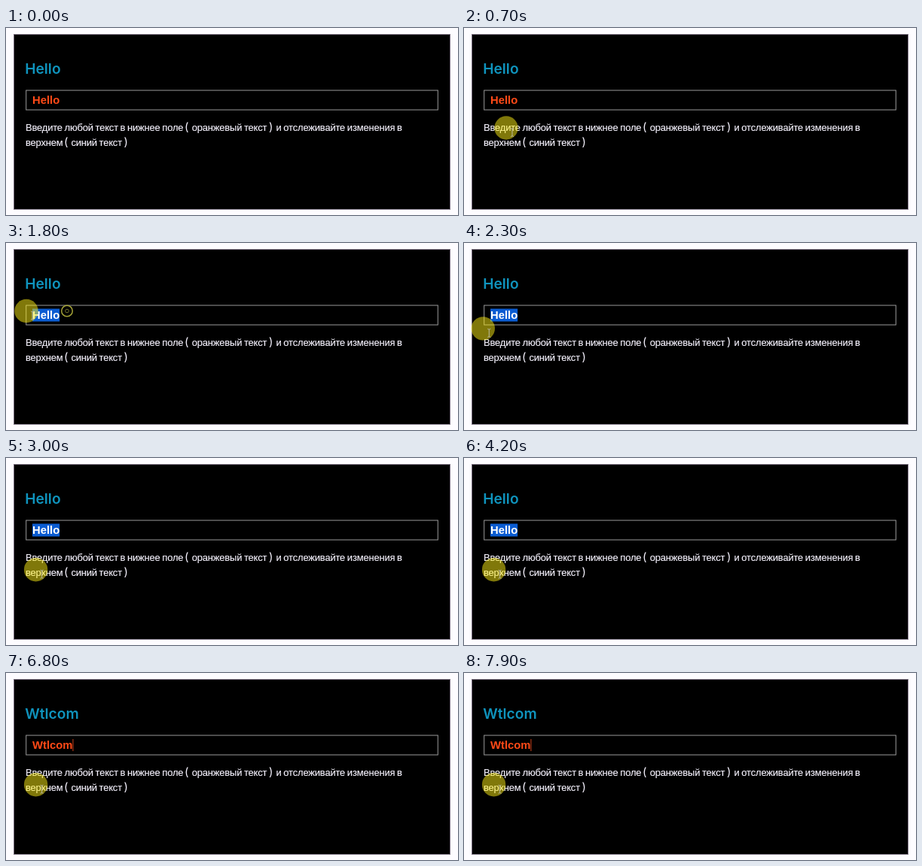
These frames come from a looping animation (600x249 px, 8 s). An HTML page:

```html
<!DOCTYPE html>
<html lang="ru">
<head>
<meta charset="utf-8">
<title>Live text</title>
<style>
  html, body { margin: 0; width: 100%; height: 100%; overflow: hidden; background: #fdfcff; }
  svg { display: block; width: 600px; height: 249px; }
  text { white-space: pre; }
  .title { font: 600 19.2px Inter, sans-serif; font-kerning: none; fill: #0f94be; }
  .field { font: bold 14.8px "Liberation Sans", Arial, sans-serif; fill: #ff4a17; }
  .note { font: 13px "Liberation Sans", Arial, sans-serif; letter-spacing: -.2px; word-spacing: -.7px;
    fill: #f3f0fb; stroke: #f3f0fb; stroke-width: .15px; }
  .paren { font: 400 15px Inter, sans-serif; fill: #f3f0fb; }
</style>
</head>
<body>
<svg viewBox="0 0 600 249">
  <rect x="10.5" y="8.5" width="579" height="233" fill="#000" stroke="#7d7384"/>
  <text class="title" id="title" x="25.2" y="60.5"></text>
  <rect x="26.7" y="83" width="546.6" height="26" fill="#000" stroke="#9a9a9a"/>
  <rect id="mark" y="87.5" height="17" fill="#0a5cd2"/>
  <text class="field" x="35" y="101"><tspan id="plain"></tspan><tspan id="picked" fill="#fff"></tspan></text>
  <rect id="caret" y="88" width="1" height="16" fill="#c8401a"/>
  <g id="note"></g>
  <g id="ring" fill="none" stroke="#a3a136">
    <circle id="wave" stroke-width="1.5"/>
    <circle r="2.3" stroke-width="1" stroke="#77762c"/>
  </g>
  <g id="pointer">
    <circle r="15.7" fill="#fff014" fill-opacity=".5"/>
    <path d="M6 .5Q8 .5 8 2V10Q8 11.5 6 11.5M10 .5Q8 .5 8 2M8 10Q8 11.5 10 11.5" fill="none" stroke="#b9b79c" stroke-width="1"/>
  </g>
</svg>
<script>
const LOOP = 8000, LEFT = 35, BLINK = 530;
const $ = id => document.getElementById(id);
const show = (el, on) => el.setAttribute("visibility", on ? "visible" : "hidden");

const note = [
  [26, 137, "Введите любой текст в нижнее поле"], [237, 137, "("],
  [246.7, 137, "оранжевый текст"], [349, 137, ")"],
  [358.6, 137, "и отслеживайте изменения в"],
  [26, 157, "верхнем"], [77, 157, "("], [86.4, 157, "синий текст"], [156.5, 157, ")"]
];
for (const [x, y, s] of note) {
  const el = document.createElementNS("http://www.w3.org/2000/svg", "text");
  el.setAttribute("class", /[()]/.test(s) ? "paren" : "note");
  el.setAttribute("x", x);
  el.setAttribute("y", y);
  el.textContent = s;
  $("note").append(el);
}

// time, value
const typed = [[0, "Hello"], [4800, "W"], [5000, "Wt"], [5200, "Wtl"],
  [5800, "Wtlc"], [6100, "Wtlco"], [6400, "Wtlcom"]];
// time, x, y
const path = [[400, 38, 147], [700, 56, 133], [1050, 74, 115], [1100, 74, 115],
  [1350, 73, 85], [1500, 73, 85], [1780, 27, 90.5], [2150, 27, 90.5],
  [2350, 25, 118], [2600, 39.6, 148.7], [LOOP, 39.6, 148.7]];
const PRESS = 1480, RELEASE = 1800;

const pen = document.createElement("canvas").getContext("2d");
function width(s) {
  pen.font = 'bold 14.8px "Liberation Sans", Arial, sans-serif';
  return pen.measureText(s).width;
}

function place(t) {
  let i = 0;
  while (i < path.length - 2 && t >= path[i + 1][0]) i++;
  const [a, x, y] = path[i], [b, u, v] = path[i + 1];
  const k = Math.min(1, Math.max(0, (t - a) / (b - a)));
  const e = k * k * (3 - 2 * k);
  return [x + (u - x) * e, y + (v - y) * e];
}

// number of characters left of the selection
function selectionStart(t, s) {
  if (t < PRESS || t >= typed[1][0]) return s.length;
  if (t >= RELEASE) return 0;
  const x = place(t)[0] + 8 - LEFT;
  let n = 0;
  while (n < s.length && (width(s.slice(0, n)) + width(s.slice(0, n + 1))) / 2 < x) n++;
  return n;
}

function draw(t) {
  const [since, word] = typed.filter(k => k[0] <= t).pop();
  $("title").textContent = word;

  const n = selectionStart(t, word), full = width(word), from = width(word.slice(0, n));
  $("plain").textContent = word.slice(0, n);
  $("picked").textContent = word.slice(n);
  $("mark").setAttribute("x", LEFT + from);
  $("mark").setAttribute("width", full - from);

  $("caret").setAttribute("x", LEFT + full);
  show($("caret"), since > 0 && Math.floor((t - since + 40) / BLINK) % 2 === 0);

  const [x, y] = place(t);
  $("pointer").setAttribute("transform", `translate(${x} ${y})`);
  show($("pointer"), t >= path[0][0]);

  const age = (t - PRESS) / 450;
  show($("ring"), age >= 0 && age < 1);
  $("ring").setAttribute("transform", "translate(81 90.5)");
  $("wave").setAttribute("r", 3 + 6 * Math.min(1, Math.max(0, age)));
}

const start = performance.now();
function tick() {
  draw((performance.now() - start) % LOOP);
  requestAnimationFrame(tick);
}
tick();
</script>
</body>
</html>
```
